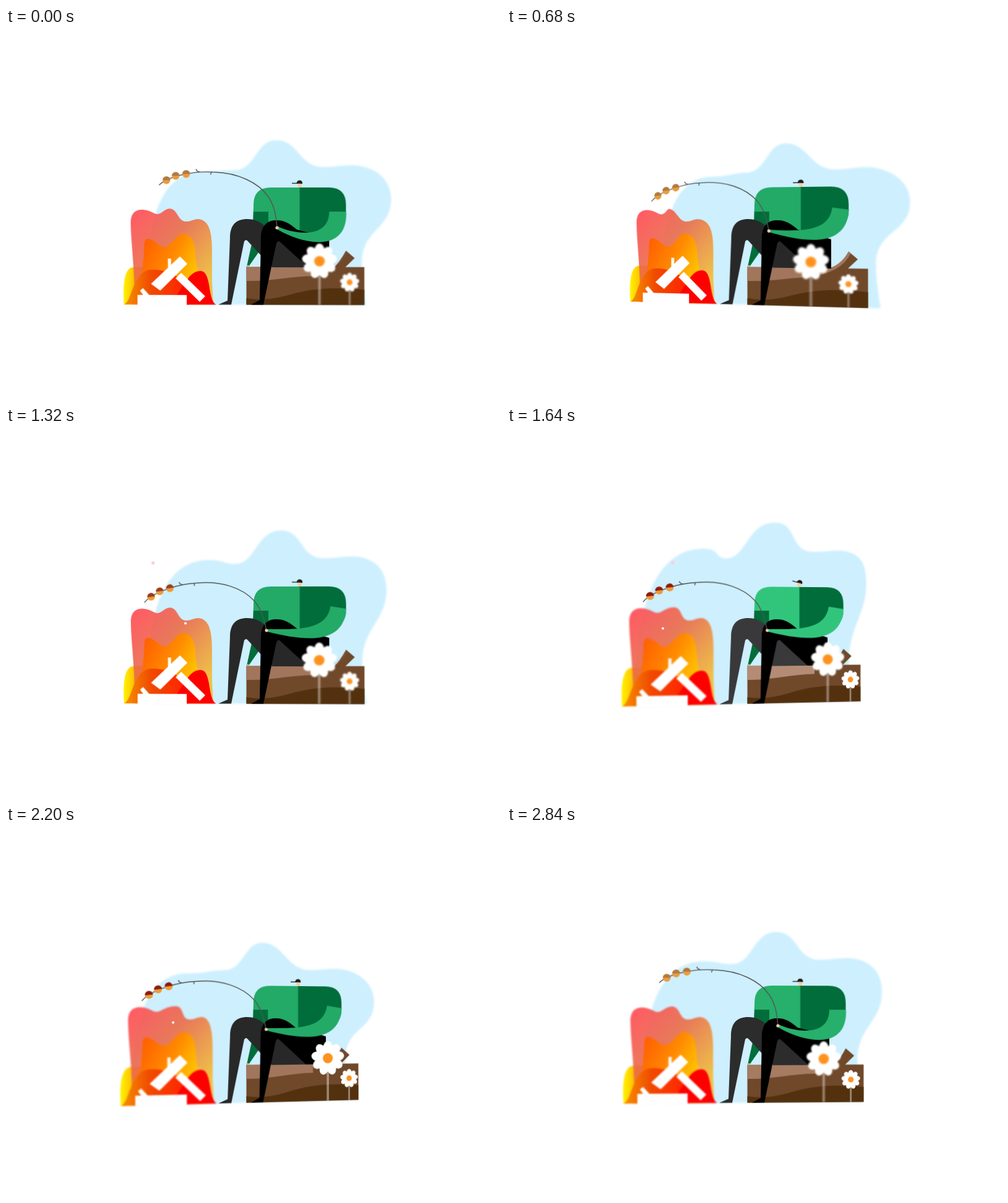
These frames come from a looping animation (800 by 600 pixels, 2880 ms). An HTML page:

```html
<!DOCTYPE html>
<html lang="en">
<head>
<meta charset="utf-8">
<title>Campfire</title>
<style>
html, body { margin: 0; width: 100%; height: 100%; overflow: hidden; background: #fff; }
#stage { position: relative; width: 800px; height: 600px; overflow: hidden; perspective: 800px; perspective-origin: 389px 315px; }
#scene { position: absolute; inset: 0; transform-style: preserve-3d; transform-origin: 389px 315px; }
/* each layer is scaled against its depth, so it keeps its size when seen head-on */
svg { position: absolute; left: 0; top: 0; width: 800px; height: 600px; overflow: visible; transform-origin: 389px 315px;
  transform: translateZ(calc(var(--z, 0) * 1px)) scale(calc(1 - var(--z, 0) / 800)); }
#skyLayer { --z: -125; filter: blur(1.6px); }
#fireLayer { --z: 6; }
#smallFlower { --z: 40; }
#bigFlower { --z: 95; }
.jacket { fill: color-mix(in srgb, #31c57c var(--glow), #23aa67); }
.shade { fill: #006d3a; }
.leg { fill: color-mix(in srgb, #39393b var(--glow), #282829); }
.bark { fill: #70482a; }
.lit { fill: color-mix(in srgb, #b48c75 var(--glow), #a1765c); }
</style>
</head>
<body>
<div id="stage">
<div id="scene">
  <svg id="skyLayer"><path id="sky" fill="#cdeffe"/></svg>

  <svg id="mainLayer">
    <path class="shade" d="M400,290H424V340L392,386H389L398,345Z"/>
    <circle cx="391" cy="385" r="1.5" fill="#f0c8a0"/>

    <path class="bark" d="M388.500,386.500H530Q538,380 549,360L563,372L548,386.500H578.500V447.500H388.500Z"/>
    <path class="lit" d="M388.500,386.500H500V401C460,401 430,410 388.500,409Z"/>
    <path class="lit" id="branchLight" d="M485,387H515Q535,384 549,360L552,363Q538,394 485,401Z"/>
    <path fill="#53310f" d="M388.500,437C425,443 450,433 475,427C510,419 545,420 578.500,423V447.500H388.500Z"/>

    <path class="leg" d="M343,447.500L358,441L362,340C362,318 372,309 390,309C402,309 410,313 418,320L500,387H430L391,345Q388,341 385,345L364,447.500Z"/>
    <path class="jacket" d="M475,258H428Q400,258 400,286V297H424V332H475Z"/>
    <path class="shade" d="M474.500,258H521Q549,258 549,286V297C549,320 530,335 474.500,332Z"/>
    <path d="M396,447.500L410,440L412,340C412,320 422,310 438,311C452,311 460,318 470,326L500,334L522,341V387H488L443,346Q440,342 437,348L416,447.500Z"/>

    <g id="head">
      <path d="M471,251H478V255L476,258H473L471,254Z" fill="#f2cda8"/>
      <path d="M469.500,251.500Q470,246.500 474.500,246.500Q479,246.500 479,252Z" fill="#1c1c1c"/>
      <path d="M462,251.200H472" stroke="#1c1c1c" stroke-width="1.300"/>
    </g>
    <path class="jacket" id="arm"/>
    <g id="stick">
      <path fill="none" stroke="#555" stroke-width="1.400" d="M247,254C256,245 275,239 291,236C305,233 320,232 335,233C375,234 408,250 424,273C434,288 437,305 438,326M313,233Q308,232 307,228M332,233L330.500,237"/>
      <g id="marshmallows"></g>
      <circle cx="438" cy="323" r="2.600" fill="#f3c9a2"/>
    </g>
  </svg>

  <svg id="fireLayer">
    <defs>
      <linearGradient id="outerFill" gradientUnits="userSpaceOnUse" x1="205" y1="300" x2="325" y2="410">
        <stop offset="0" stop-color="#ff4a54"/><stop offset=".45" stop-color="#ea6c48"/><stop offset="1" stop-color="#f2bc34"/>
      </linearGradient>
      <linearGradient id="midFill" gradientUnits="userSpaceOnUse" x1="225" y1="350" x2="312" y2="395">
        <stop offset="0" stop-color="#ff6200"/><stop offset=".5" stop-color="#ff8a00"/><stop offset="1" stop-color="#ffca00"/>
      </linearGradient>
      <linearGradient id="sideFill" gradientUnits="userSpaceOnUse" x1="190" y1="0" x2="240" y2="0">
        <stop offset="0" stop-color="#fff000"/><stop offset=".35" stop-color="#ffc000"/><stop offset="1" stop-color="#ff5a00"/>
      </linearGradient>
      <linearGradient id="coreFill" gradientUnits="userSpaceOnUse" x1="200" y1="0" x2="285" y2="0">
        <stop offset="0" stop-color="#f58200"/><stop offset=".4" stop-color="#f04a00"/><stop offset="1" stop-color="#ff2600"/>
      </linearGradient>
    </defs>
    <path fill="url(#sideFill)" d="M190,447.500C188,420 189,387 206,387H240V447.500Z"/>
    <path id="outer" fill="url(#outerFill)" opacity=".9"/>
    <path id="mid" fill="url(#midFill)"/>
    <path fill="url(#coreFill)" d="M190,447.500C204,444 203,391 236,391C258,391 268,398 284,406L296,447.500Z"/>
    <path fill="#f00" d="M262,447.500C284,430 292,393 314,393C333,393 325,440 340,447.500Z"/>
    <g fill="#fff">
      <path d="M212,432H292V449H212Z"/>
      <path d="M234,414L281,369.500L293,381.500L249,425Z"/>
      <path d="M261.500,373H266.500V388H261.500Z"/>
      <path d="M274,405L283,396L322,434L313,443Z"/>
      <path d="M216,425L221,421L231,432L224,436Z"/>
    </g>
  </svg>

  <svg id="smallFlower"></svg>
  <svg id="bigFlower"></svg>
</div>
<svg id="sparks"></svg>
</div>

<script>
const LOOP = 2880, CYCLE = 3000, STEP = 40;
const $ = id => document.getElementById(id);

// 0 to 1 between two moments, soft at both ends
function ease(t, from, to) {
  const u = Math.max(0, Math.min(1, (t - from) / (to - from)));
  return u * u * (3 - 2 * u);
}

// Rises, holds and falls again; the fall may reach into the next cycle.
function pulse(t, rise, top, fall, end) {
  const at = time => ease(time, rise, top) - ease(time, fall, end);
  return Math.max(at(t), at(t + CYCLE));
}

const wave = (t, peak, period) => Math.cos((t - peak) / period * 2 * Math.PI);

const swing = t => 9.4 - 18.4 * pulse(t, 900, 1800, 2320, 3620);
const billow = t => 8 - 40 * pulse(t, 700, 1920, 1930, 2200) - 30 * pulse(t, 2210, 2520, 2540, 3200);
const flicker = t => 3 + 9 * wave(t, 2150, CYCLE);
const reach = t => pulse(t, 300, 800, 2260, 2740);
const roast = t => pulse(t, 1060, 1500, 2260, 2740);
const nod = t => pulse(t, 1240, 1600, 1680, 2100);
const glow = t => wave(t, 270, 2740) ** 20;

function skyPath(b) {
  const hump = 230 + 1.2 * b, humpX = 318 - .6 * b, dip = 229 + .6 * b;
  const peak = 180 + b, peakX = 436 - .5 * b, shoulder = 221 + .9 * b, tipX = 619 + .6 * b, tip = 275 + .9 * b;
  return `M226,447.5C222,310 248,${hump} ${humpX},${hump}C${humpX + 24},${hump} 350,${dip} 368,${dip}
    C402,${dip} 402,${peak} ${peakX},${peak}C${peakX + 36},${peak} 472,${shoulder + 3} 512,${shoulder + 3}
    C530,${shoulder + 3} 540,${shoulder} 555,${shoulder}C595,${shoulder} ${tipX},${tip - 30} ${tipX},${tip}
    C${tipX},${tip + 50} 573,325 573,380C573,405 577,430 580,447.5Z`;
}

const outerPath = f => `M207,447.5C208,390 201,345 201,315C201,286 228,293 238,299C250,306 254,292 ${263 + f},292
  C${276 + f},292 ${277 + f / 2},313 ${290 + f / 2},313C${299 + f / 2},313 ${302 + f / 2},309 ${310 + f / 2},309
  C330,310 333,335 333,360V410L335,447.5Z`;

const midPath = f => `M214,447.5C218,410 223,370 223,350C224,332 240,345 250,353C266,361 272,333 ${286 + f / 5},333
  C306,334 306,360 307,378C308,395 318,400 320,447.5Z`;

function armPath(q) {
  const mix = (a, b) => a + (b - a) * q;
  return `M${mix(439, 422)},${mix(321, 327)}C470,${mix(335, 327)} ${mix(522, 518)},${mix(340, 330)} ${mix(522, 524)},${mix(297, 290)}
    L549.5,${mix(297, 294)}C${mix(552, 545)},${mix(365, 350)} ${mix(480, 490)},${mix(350, 348)} ${mix(439, 422)},${mix(326, 331)}Z`;
}

function flower(id, x, y, r, stem) {
  let petals = '';
  for (let a = 0; a < 360; a += 40)
    petals += `<ellipse cx="${x}" cy="${y - r * .64}" rx="${r * .27}" ry="${r * .36}" transform="rotate(${a} ${x} ${y})"/>`;
  $(id).innerHTML = `<path d="M${x},${y}V447.5" stroke="#fff" stroke-opacity=".4" stroke-width="${stem}"/>
    <g fill="#fff">${petals}<circle cx="${x}" cy="${y}" r="${r * .76}"/></g>
    <circle cx="${x}" cy="${y}" r="${r * .3}" fill="#ff921e"/>`;
}
flower('bigFlower', 508, 377, 28.5, 4);
flower('smallFlower', 555.5, 411, 15.5, 3);

const marshmallow = ([x, y]) => `<circle cx="${x}" cy="${y}" r="6.2" fill="#eb9c3c"/>
  <path d="M${x - 6.2},${y}a6.2,6.2 0 0 1 12.4,0Z"/>`;
$('marshmallows').innerHTML = [[259, 246], [274, 239], [291, 236]].map(marshmallow).join('');

// birth time and place of each spark; all rise and drift left alike
const sparks = [[290, 282], [717, 280], [1035, 310], [1382, 270], [1916, 290]];

function drawSpark(age, startX) {
  if (age < 0 || age > 755) return '';
  const x = startX - .07 * age, y = 405 - .307 * age, aboveFire = y < 285;
  return `<circle cx="${x}" cy="${y}" r="${aboveFire ? 2.7 : 2}" fill="${aboveFire ? '#fcd' : '#fff'}"/>`;
}

function draw(t) {
  const angle = swing(t), f = flicker(t), q = reach(t);
  $('scene').style.transform = `rotateY(${-angle}deg)`;
  $('stage').style.setProperty('--glow', glow(t) * 100 + '%');
  $('sky').setAttribute('d', skyPath(billow(t)));
  $('outer').setAttribute('d', outerPath(f));
  $('mid').setAttribute('d', midPath(f));
  $('arm').setAttribute('d', armPath(q));
  $('stick').setAttribute('transform', `translate(${-17 * q} ${6 * q}) rotate(${-7 * q} 438 323)`);
  $('marshmallows').style.fill = `color-mix(in srgb, #8c1c10 ${roast(t) * 100}%, #b07a46)`;
  $('head').setAttribute('transform', `rotate(${14 * nod(t)} 474.5 253)`);
  $('branchLight').style.opacity = Math.max(0, Math.min(1, angle / 8));
  // shallow focus: whatever turns towards the viewer gets softer
  $('fireLayer').style.filter = `blur(${.75 - .06 * angle}px)`;
  $('bigFlower').style.filter = `blur(${1.2 + .05 * angle}px)`;
  $('smallFlower').style.filter = `blur(${.8 + .03 * angle}px)`;
  $('sparks').innerHTML = sparks.map(([birth, x]) => drawSpark(t - birth, x)).join('');
}

function frame() {
  draw(Math.floor(performance.now() % LOOP / STEP) * STEP);
  requestAnimationFrame(frame);
}
frame();
</script>
</body>
</html>
```
